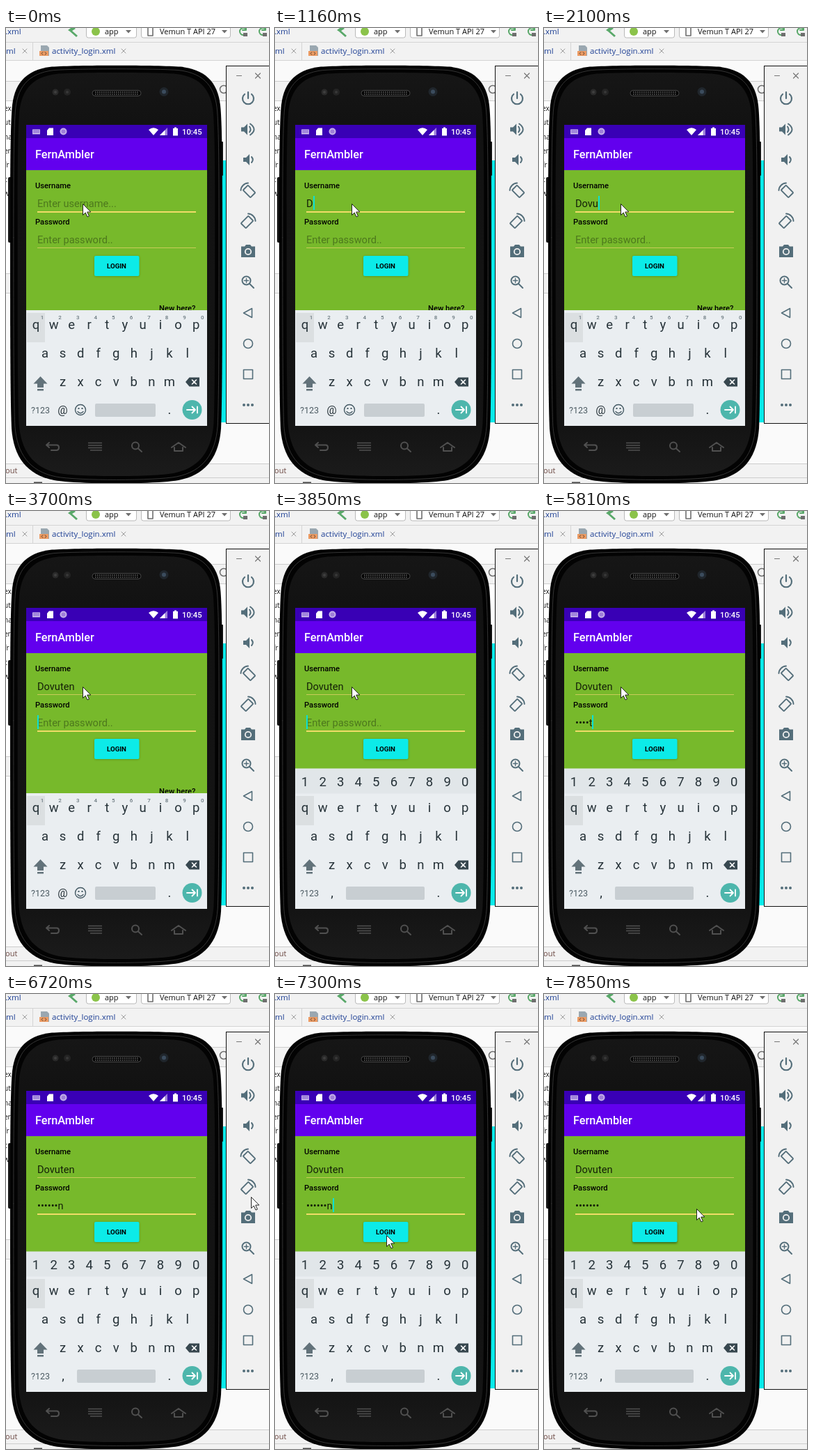
Recreate the animation shown at these times as an HTML page. Size 378 by 653 pixels, loop 8000 ms.

```html
<!DOCTYPE html>
<html lang="en">
<head>
<meta charset="utf-8">
<title>Login demo</title>
<style>
  html, body { margin: 0; width: 100%; height: 100%; overflow: hidden; background: #f2f2f2; }
  svg { display: block; width: 378px; height: 653px; }
  text { font-family: Roboto, sans-serif; white-space: pre; }
  .ide text { font-family: "Open Sans", "Noto Sans", sans-serif; font-size: 11px; fill: #111; }
  .ide .tab { font-size: 11.5px; fill: #1d3f94; }
  .ide .code { font-size: 10px; }
  .line { fill: none; stroke-linecap: round; stroke-linejoin: round; }
  .field { font-size: 14.6px; }
  .label { font-size: 11.2px; font-weight: 500; }
  .key { font-size: 18.5px; fill: #263238; text-anchor: middle; }
  .hint { font-size: 8px; font-weight: 500; fill: #6c7a81; text-anchor: middle; }
</style>
</head>
<body>
<svg viewBox="0 0 378 653">
  <defs>
    <clipPath id="appClip"><rect x="29" y="204" width="260" height="201"/></clipPath>
    <linearGradient id="faceShade" x2="0" y2="1">
      <stop stop-color="#161616"/><stop offset=".12" stop-color="#121212"/>
      <stop offset=".88" stop-color="#141414"/><stop offset="1" stop-color="#1b1b1b"/>
    </linearGradient>
    <filter id="blur" x="-20%" y="-40%" width="140%" height="190%"><feGaussianBlur stdDeviation="1.6"/></filter>
    <path id="body" d="M6 300C6 220 6 150 8.5 116C11 82 26 60 66 55.5C100 53 218 53 251 55.5C291 60 306 82 308.5 116
      C311 150 311 220 311 300C311 420 311 530 309 575C306 615 288 641 248 649C215 655 102 655 69 649
      C29 641 11 615 8 575C6 530 6 420 6 300z"/>
    <g id="rotateIcon" class="line" stroke="#546e7a" stroke-width="1.9">
      <rect x="-5" y="-7.5" width="10" height="15" rx="1" transform="translate(1.5 1.5) rotate(-45)"/>
      <path d="M-10.5 0A11 11 0 0 1 0-10.5"/>
    </g>
    <path id="speaker" d="M-9-3h4l5-5V8L-5 3h-4z" fill="#546e7a"/>
    <path id="down" d="M-4-2H4L0 2.5z" fill="#6e6e6e"/>
    <path id="close" class="line" d="M-3-3 3 3M3-3-3 3" stroke="#9a9a9a"/>
  </defs>

  <g class="ide">
    <rect width="378" height="653" fill="#f2f2f2"/>
    <text class="tab" x="-1" y="9">.xml</text>
    <path d="M89 3 96-2 100 1 95 4 103 11 101 13 92 5z" fill="#59a869"/>
    <g fill="#fff" stroke="#b9b9b9">
      <rect x="115.5" y="-8" width="72" height="22" rx="3"/>
      <rect x="194.5" y="-8" width="128" height="22" rx="3"/>
    </g>
    <circle cx="129" cy="5" r="6" fill="#8bc34a"/>
    <text x="142" y="9">app</text>
    <use href="#down" x="176" y="5"/>
    <path d="M204-2h7v13h-7z" class="line" stroke="#6e6e6e" stroke-width="1.6"/>
    <text x="221" y="9">Vemun T API 27</text>
    <use href="#down" x="314" y="5"/>
    <path class="line" stroke="#59a869" stroke-width="2" d="M345 2a5 5 0 1 0 0 6M345-2v5h-5M373 2a5 5 0 1 0 0 6M373-2v5h-5"/>
    <path d="M341 7h6v5h-6zM369 7h6v5h-6z" fill="#6e6e6e"/>
    <path d="M0 20.5H378M0 46.5H378M38.5 21V46" stroke="#d4d4d4"/>
    <text class="tab" x="0" y="37">ml</text>
    <use href="#close" x="27" y="33"/>
    <path d="M50 25h9l3 3v12H50z" fill="#9aa7b0"/>
    <path d="M48 33h13v7H48z" fill="#ec9b63"/>
    <path class="line" d="M53 34.5 51 36.5 53 38.5M56 34.5 58 36.5 56 38.5" stroke="#554030"/>
    <text class="tab" x="66" y="37">activity_login.xml</text>
    <use href="#close" x="169" y="33"/>
    <rect y="47" width="378" height="29" fill="#fafafa"/>
    <rect y="104" width="378" height="248" fill="#fff"/>
    <rect y="381" width="378" height="245" fill="#fafafa"/>
    <path d="M0 76.5H378M0 104.5H378M0 352.5H378M0 380.5H378M0 625.5H378M0 645.5H378" stroke="#cdcdcd"/>
    <circle cx="313" cy="88" r="5.5" class="line" stroke="#6e6e6e" stroke-width="1.5"/>
    <g id="snippets"></g>
    <text x="-1" y="639" style="fill:#6a4640">out</text>
    <path d="M40 653h12" stroke="#444" stroke-width="3"/>
    <rect x="308" y="190" width="9" height="376" fill="#08eaea"/>
  </g>

  <g>
    <rect x="3" y="214" width="8" height="94" rx="2" fill="#171717"/>
    <rect x="306" y="163" width="6" height="49" rx="1" fill="#171717"/>
    <use href="#body" fill="#030303"/>
    <use href="#body" class="line" stroke="#3c3c3c" stroke-width=".9" transform="translate(158.5 353) scale(.968 .983) translate(-158.5 -353)"/>
    <use href="#body" fill="url(#faceShade)" transform="translate(158.5 353) scale(.93 .965) translate(-158.5 -353)"/>
    <rect x="124" y="89.5" width="70" height="8" rx="4" fill="#050505" stroke="#4a4a4a"/>
    <path d="M128 92H190M128 95H190" stroke="#666" stroke-width="1.4" stroke-dasharray="1.6 1.4"/>
    <circle cx="71" cy="92" r="4.5" fill="#2a2a2a"/><circle cx="88" cy="92" r="5" fill="#242424"/>
    <circle cx="71" cy="92" r="2" fill="#3f3f3f"/><circle cx="88" cy="92" r="2" fill="#383838"/>
    <circle cx="227" cy="91.5" r="6.5" fill="#20262c"/><circle cx="227" cy="91.5" r="3" fill="#3b4c5d"/>
    <g class="line" stroke="#505050" stroke-width="2">
      <path d="M62 595 58 598.5 62 602M59 598.5H73Q76 598.5 76 602T73 606H65"/>
      <path d="M118 595.5H138M118 599H138M118 602.5H138M121 606H138" stroke-width="1.7" stroke-linecap="butt"/>
      <circle cx="186" cy="599.5" r="5"/><path d="M190 603.5 195 608"/>
      <path d="M238 602 248 595 258 602M242 602V607H254V602"/>
    </g>
  </g>

  <g>
    <rect x="29" y="139" width="260" height="432" fill="#77b92b"/>
    <rect x="29" y="139" width="260" height="20" fill="#3900b5"/>
    <rect x="29" y="158" width="260" height="46" fill="#6200ee"/>
    <g fill="#fff">
      <path d="M38 145.5H49V152.5H38z" opacity=".7"/>
      <path d="M39.5 147.5H48M39.5 149.5H48" stroke="#3900b5" stroke-dasharray="1 1"/>
      <path d="M59 147 62 143.5H68V154H59z"/>
      <circle cx="82.5" cy="148.5" r="5" fill="#c4b0e9"/>
      <circle cx="82.5" cy="148.5" r="3" fill="#9f7fd9"/>
      <path d="M205 146Q212 140.5 219 146L212 154z"/>
      <path d="M221 154 232 143V154z" opacity=".5"/><path d="M221 154 228.5 146.5V154z"/>
      <path d="M240 144h2v-1.5h3V144h2v10.5h-7z"/>
      <text x="253" y="153" font-size="11.3" font-weight="500">10:45</text>
      <text x="42" y="187" font-size="16.3" font-weight="500">FernAmbler</text>
    </g>
    <g clip-path="url(#appClip)">
      <text class="label" x="42" y="229.5">Username</text>
      <text class="label" x="42" y="282">Password</text>
      <text class="label" x="220" y="405.5">New here?</text>
    </g>
    <rect id="userLine" x="45" y="263" width="228"/>
    <rect id="passLine" x="45" y="315" width="228"/>
    <text id="user" class="field" x="45" y="256.5"></text>
    <text id="pass" class="field" x="45" y="308.5"></text>
    <rect id="caret" width="2" height="20" fill="#0ce0d6"/>
    <rect id="shadow" x="127" width="64.5" height="29" rx="2" fill="#173b0c" filter="url(#blur)"/>
    <rect x="127" y="327" width="64.5" height="29" rx="2" fill="#0cebe8"/>
    <text x="159" y="345" font-size="9.7" font-weight="700" text-anchor="middle">LOGIN</text>
  </g>

  <g>
    <rect x="29" y="405" width="260" height="166" fill="#eaeef1"/>
    <rect x="30" y="409" width="26" height="42" fill="#dbdfe1"/>
    <g id="keys"></g>
    <path d="M49.5 500 39.5 510.5H45V516H54V510.5H59.5zM45 518H54V520.5H45z" fill="#62727a"/>
    <path d="M258 508 263.5 501.5H278V514.5H263.5z" fill="#37474f"/>
    <path class="line" d="M267.5 505 273.5 511M273.5 505 267.5 511" stroke="#fff" stroke-width="1.6"/>
    <text x="36" y="553" font-size="12.5" fill="#4b5a62">?123</text>
    <text class="key" x="235" y="554">.</text>
    <circle cx="267.5" cy="548" r="14" fill="#4db6ac"/>
    <path class="line" d="M260 548H272M267.5 543.5 272 548 267.5 552.5M275 543.5V552.5" stroke="#fff" stroke-width="1.8"/>
    <g id="textKeys">
      <g id="hints"></g>
      <text class="key" x="81.5" y="554" style="font-size:16px">@</text>
      <g class="line" stroke="#455a64" stroke-width="1.4">
        <circle cx="107" cy="548" r="7.5"/><path d="M103 550.5Q107 555 111 550.5"/>
      </g>
      <path d="M103.5 545h2v2h-2zM108.5 545h2v2h-2z" fill="#455a64"/>
      <rect x="128" y="539" width="87" height="19" rx="2" fill="#c8ced2"/>
    </g>
    <g id="passKeys">
      <rect x="29" y="369.5" width="260" height="36" fill="#e1e6e9"/>
      <g id="digits"></g>
      <text class="key" x="82" y="554">,</text>
      <rect x="102" y="539" width="113" height="19" rx="2" fill="#c8ced2"/>
    </g>
  </g>

  <g>
    <rect x="316.5" y="54.5" width="70" height="513" fill="#f1f1f1" stroke="#111"/>
    <path class="line" d="M331.5 68.5H338.5M358.5 65 365.5 72M365.5 65 358.5 72" stroke="#777" stroke-width="1.2"/>
    <path class="line" d="M343 95A8 8 0 1 0 353 95M348 92V101" stroke="#546e7a" stroke-width="2.2"/>
    <use href="#speaker" x="347" y="145.5"/>
    <path class="line" d="M350 141.5Q353 145.5 350 149.5M351 137.5Q362 145.5 351 153.5" stroke="#546e7a" stroke-width="2"/>
    <use href="#speaker" x="350" y="189"/>
    <path class="line" d="M353 185Q356.5 189 353 193" stroke="#546e7a" stroke-width="2"/>
    <use href="#rotateIcon" transform="translate(348 233)"/>
    <use href="#rotateIcon" transform="translate(348 277) scale(-1 1)"/>
    <path d="M338 313.5H343L345 311H351L353 313.5H358V329H338z" fill="#546e7a"/>
    <circle cx="348" cy="321" r="4.2" fill="#546e7a" stroke="#f1f1f1" stroke-width="1.8"/>
    <g class="line" stroke="#546e7a" stroke-width="2">
      <circle cx="345.5" cy="362.5" r="6"/><path d="M350 367 356 373"/>
      <path d="M342.5 362.5H348.5M345.5 359.5V365.5" stroke-width="1.4"/>
      <path d="M353.5 402.5V415.5L341.5 409z" stroke-width="1.6"/>
      <circle cx="348" cy="453" r="6.5" stroke-width="1.6"/>
      <path d="M341.5 490.5H354.5V503.5H341.5z" stroke-width="1.6"/>
    </g>
    <g fill="#546e7a"><circle cx="342" cy="541" r="2"/><circle cx="348" cy="541" r="2"/><circle cx="354" cy="541" r="2"/></g>
  </g>

  <path id="mouse" d="M.5.5V16.5L4.2 13 7 19 9.4 18 6.7 12H11.8z" fill="#fff" stroke="#111" stroke-width=".9"/>
</svg>
<script>
const LOOP = 8000, NAME = "Dovuten", FIELD_X = 45;
const FOCUS_PASS = 3700, SWAP_KEYS = 3850, MASK_LAST = 7700, PRESS = 7570;
const userTimes = [1160, 1700, 1820, 2100, 2370, 2490, 2770];
const passTimes = [4660, 4970, 5270, 5520, 5810, 5930, 6210];
// Each entry: start time, then value.
const caretSteps = [[0, 0], [250, 1], [650, 0], [1160, 1], [3300, 0], [3700, 1],
  [4240, 0], [4660, 1], [6600, 0], [7170, 1], [7700, 0]];
const mouseSteps = [[0, [110, 252]], [6720, [352, 291]], [6880, null], [7030, [166, 358]],
  [7300, [160, 346]], [7420, [156, 338]], [7850, [219, 308]]];

const el = Object.fromEntries([...document.querySelectorAll("[id]")].map(e => [e.id, e]));
const at = (steps, t) => steps.findLast(([start]) => start <= t)[1];
const typed = (times, t) => times.filter(start => start <= t).length;
const show = (e, on) => e.setAttribute("visibility", on ? "visible" : "hidden");
const set = (e, attrs) => Object.entries(attrs).forEach(([k, v]) => e.setAttribute(k, v));

function addRow(parent, chars, x, y, cls) {
  [...chars].forEach((char, i) => addText(parent, char, x + i * 25.58, y, cls));
}
function addText(parent, content, x, y, cls) {
  const text = document.createElementNS("http://www.w3.org/2000/svg", "text");
  set(text, { x, y, class: cls });
  text.textContent = content;
  parent.append(text);
}
addRow(el.keys, "qwertyuiop", 43, 431.5, "key");
addRow(el.keys, "asdfghjkl", 56, 472.5, "key");
addRow(el.keys, "zxcvbnm", 81.5, 514, "key");
addRow(el.hints, "1234567890", 52, 418, "hint");
addRow(el.digits, "1234567890", 43, 394.5, "key");
["ex", "ut", "na", "er", "fr", "c", "w"].forEach((s, i) =>
  addText(el.snippets, s, -3, 119 + i * 20.3, "code"));

function setField(text, value, hint) {
  text.textContent = value || hint;
  text.setAttribute("fill", value ? "#142008" : "#4d781d");
}
function setLine(line, focused) {
  set(line, { height: focused ? 2 : 1, fill: focused ? "#f0dc68" : "#c8cc59" });
}

function draw(t) {
  const user = NAME.slice(0, typed(userTimes, t));
  const count = typed(passTimes, t);
  const dots = t >= MASK_LAST ? count : Math.max(0, count - 1);
  const pass = "•".repeat(dots) + NAME.slice(dots, count);
  const onPass = t >= FOCUS_PASS, passKeyboard = t >= SWAP_KEYS;

  setField(el.user, user, "Enter username...");
  setField(el.pass, pass, "Enter password..");
  setLine(el.userLine, !onPass);
  setLine(el.passLine, onPass);

  const active = onPass ? el.pass : el.user;
  const width = (onPass ? pass : user) ? active.getComputedTextLength() : 0;
  set(el.caret, { x: Math.round(FIELD_X + width), y: onPass ? 293 : 241 });
  show(el.caret, at(caretSteps, t));

  show(el.textKeys, !passKeyboard);
  show(el.passKeys, passKeyboard);
  set(el.shadow, t >= PRESS ? { y: 329, opacity: .6 } : { y: 327.5, opacity: .35 });

  const mouse = at(mouseSteps, t);
  show(el.mouse, mouse);
  if (mouse) el.mouse.setAttribute("transform", `translate(${mouse})`);
}

function tick() {
  draw(performance.now() % LOOP);
  requestAnimationFrame(tick);
}
tick();
</script>
</body>
</html>
```
